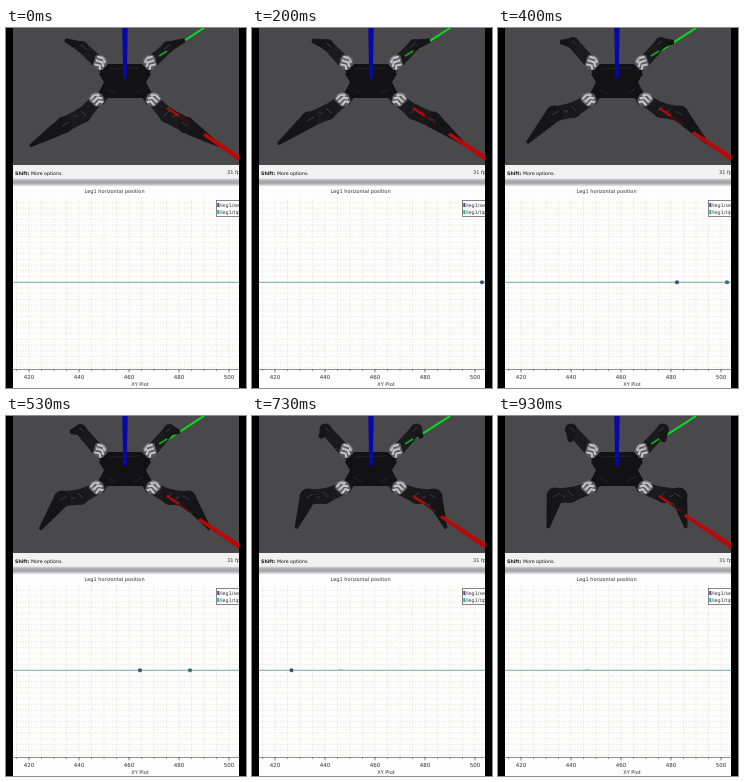
An HTML page for the animation above (0.99 s loop, 240x360 px).

```html
<!DOCTYPE html>
<html lang="en">
<head>
<meta charset="utf-8">
<title>Leg motion and plot</title>
<style>
html, body { margin: 0; width: 100%; height: 100%; overflow: hidden; background: #000; }
svg { display: block; width: 100vw; height: 100vh; font-family: "DejaVu Sans", sans-serif; fill: #333; }
</style>
</head>
<body>
<svg viewBox="0 0 240 360">
  <defs>
    <clipPath id="stage"><rect x="7" width="226" height="360"/></clipPath>
    <clipPath id="scene"><rect x="7" width="226" height="137"/></clipPath>
    <linearGradient id="bar" x2="0" y2="1">
      <stop offset="0" stop-color="#dcdcdc"/>
      <stop offset=".3" stop-color="#a8a8ac"/>
      <stop offset=".6" stop-color="#a8a8ac"/>
      <stop offset="1" stop-color="#f4f4f4"/>
    </linearGradient>
    <g id="joint">
      <path d="M-8-3L-4-7L3-7L7-2L6 5L1 8L-5 6Z" fill="#59595c"/>
      <path d="M-6-3L0-5L4-2M-5 1L1-1L5 2M-4 5L1 3L4 6" stroke="#c4c4c8" stroke-width="2.2" fill="none"/>
      <path d="M-3-6L4-4M-6 0L-2-1" stroke="#a0a0a4" stroke-width="1.4"/>
    </g>
  </defs>
  <g clip-path="url(#stage)">
    <g clip-path="url(#scene)">
      <rect x="7" width="226" height="137" fill="#49494c"/>
      <path d="M198 0L153 29" stroke="#08dc1c" stroke-width="2"/>
      <g id="left"></g>
      <g id="right" transform="translate(238 0) scale(-1 1)"></g>
      <path d="M102 36H136L145 46L140 54L145 64L137 70H101L93 64L98 54L93 46Z" fill="#121214"/>
      <path d="M103 41L133 40M101 61L110 66M137 61L128 66" stroke="#252529" fill="none"/>
      <path d="M153 28L161 23" stroke="#0cae1a" stroke-width="1.5"/>
      <path d="M161 80L173 88" stroke="#b00a0a" stroke-width="2.4"/>
      <path d="M173 88L184 96" stroke="#4c0d0f" stroke-width="2"/>
      <path id="red" fill="#b80808"/>
      <path d="M116.3 0H121.7L120.8 50H117.2Z" fill="#0708a8"/>
    </g>

    <rect x="7" y="137" width="226" height="14" fill="#f1f1f1"/>
    <text x="9" y="147" font-size="4.7" fill="#111"><tspan font-weight="bold">Shift:</tspan> More options.</text>
    <text x="221" y="146" font-size="5">31 fps</text>
    <rect x="7" y="157" width="226" height="203" fill="#fdfdfd"/>
    <rect x="7" y="150.5" width="226" height="8" fill="url(#bar)"/>
    <text x="78.5" y="164.7" font-size="5">Leg1 horizontal position</text>
    <path id="grid" stroke="#dedecb" stroke-width=".6" stroke-dasharray="1.5 1.5"/>
    <path d="M7 254.3H233" stroke="#62aaa0" stroke-width=".9"/>
    <path id="blip" d="M87 253.8H91" stroke="#87c6bc" stroke-width="1.3"/>
    <g id="dots"></g>
    <path id="axis" stroke="#777" stroke-width=".8"/>
    <g id="ticks" font-size="5.5" text-anchor="middle"></g>
    <text x="134" y="357.8" font-size="5" text-anchor="middle">XY Plot</text>
    <rect x="210.5" y="172.5" width="40" height="16" fill="#fff" stroke="#666" stroke-width=".8"/>
    <path d="M212.3 175V179" stroke="#5a3f80" stroke-width="2"/>
    <path d="M212.3 182V186" stroke="#20b4aa" stroke-width="2"/>
    <text x="213.6" y="179.2" font-size="4.9">/leg1/servo</text>
    <text x="213.6" y="186.2" font-size="4.9">/leg1/tip</text>
  </g>
</svg>
<script>
const $ = id => document.getElementById(id);
const NS = "http://www.w3.org/2000/svg";
const LOOP = 990, STEPS = 15;
const keys = [0, 70, 200, 400, 530, 730, 930];

// One track per coordinate, sampled at the key times:
// front elbow, knee and tip, rear knee and tip, red axis, plot marker.
const pose = {
  bx: [77, 77, 76, 75, 74, 73, 72],
  by: [87, 86, 84, 82, 81, 80, 79],
  cx: [58, 58, 57, 56, 56, 56, 57],
  cy: [97, 96, 92, 86, 83, 81, 80],
  tx: [24, 24.5, 26, 29, 34, 44, 50],
  ty: [118, 117, 116, 115, 113.5, 112.5, 112],
  mx: [76, 76, 75.5, 75, 74.5, 73.5, 73],
  my: [19, 18.5, 17, 15, 14, 13.5, 13.5],
  rx: [59, 59, 60, 62, 64, 68, 72],
  ry: [12, 12, 12.5, 14, 16, 22, 26],
  red: [198, 198, 197, 195, 193, 189, 187],
  dot: [272, 258, 230, 179, 134, 39.5, -70]
};

function add(parent, tag, attrs) {
  const el = document.createElementNS(NS, tag);
  for (const k in attrs) el.setAttribute(k, attrs[k]);
  parent.append(el);
  return el;
}

function slope(v, i) {
  const a = Math.max(i - 1, 0), b = Math.min(i + 1, v.length - 1);
  return (v[b] - v[a]) / (keys[b] - keys[a]);
}

function sample(v, t) {
  let i = 0;
  while (i < keys.length - 2 && t >= keys[i + 1]) i++;
  const h = keys[i + 1] - keys[i], u = Math.min((t - keys[i]) / h, 1);
  const w = u * u * (3 - 2 * u);
  return v[i] * (1 - w) + v[i + 1] * w +
    h * u * (1 - u) * ((1 - u) * slope(v, i) - u * slope(v, i + 1));
}

// Quadrilateral between two points with a width at each end.
function limb(x1, y1, x2, y2, w1, w2) {
  const d = Math.hypot(x2 - x1, y2 - y1) || 1;
  const nx = (y1 - y2) / d / 2, ny = (x2 - x1) / d / 2;
  return `M${x1 + nx * w1} ${y1 + ny * w1}L${x2 + nx * w2} ${y2 + ny * w2}` +
    `L${x2 - nx * w2} ${y2 - ny * w2}L${x1 - nx * w1} ${y1 - ny * w1}Z`;
}

const sides = ["left", "right"].map(id => {
  const g = $(id);
  const part = (fill, tag = "path", more) => add(g, tag, { fill, ...more });
  const s = {
    rear: part("#1b1b1d"), foot: part("#151517"),
    rearKnee: part("#171719", "circle", { r: 6 }),
    shin: part("#151517"), thigh: part("#1b1b1d"),
    knee: part("#161618", "circle", { r: 8.5 }),
    elbow: part("#19191b", "circle", { r: 8 }), trim: part("none")
  };
  s.trim.setAttribute("stroke", "#3a3a48");
  add(g, "path", { d: "M87 26L98 34L107 47L98 48L88 37ZM87 70L98 58L107 62L97 77Z", fill: "#19191b" });
  for (const at of ["translate(94.5 34.5) rotate(35)", "translate(91 71) rotate(-28)"])
    add(g, "use", { href: "#joint", transform: at });
  return s;
});

function drawLeg(s, p) {
  const set = (el, d) => el.setAttribute("d", d);
  const place = (el, x, y) => { el.setAttribute("cx", x); el.setAttribute("cy", y); };
  const sx = p.cx * .72 + p.tx * .28, sy = p.cy * .72 + p.ty * .28;
  set(s.rear, limb(91, 33, p.mx, p.my, 12, 11));
  set(s.foot, limb(p.mx, p.my, p.rx, p.ry, 11, 4));
  place(s.rearKnee, p.mx, p.my);
  set(s.shin, limb(p.cx, p.cy, sx, sy, 16, 13) + limb(sx, sy, p.tx, p.ty, 13, 3));
  set(s.thigh, limb(90, 73, p.bx, p.by, 12, 15) + limb(p.bx, p.by, p.cx, p.cy, 15, 15));
  place(s.knee, p.cx, p.cy);
  place(s.elbow, p.bx, p.by);
  set(s.trim, `M${p.bx - 2} ${p.by - 4}l5 5M${p.cx + 5} ${p.cy - 3}l-7 4` +
    `M${p.mx - 1} ${p.my - 2}l5 4M${p.bx - 9} ${p.by}l4 2`);
}

let grid = "", axis = "M7 341.5H233";
for (let x = 10.5; x < 233; x += 12.5) {
  grid += `M${x} 169V341`;
  axis += `M${x} 341.5v1.5`;
}
for (let y = 174.5; y < 341; y += 5.7) grid += `M7 ${y}H233`;
$("grid").setAttribute("d", grid);
for (let i = 0; i < 5; i++) {
  const x = 23 + i * 50;
  axis += `M${x} 341.5v3`;
  add($("ticks"), "text", { x, y: 350.8 }).textContent = 420 + i * 20;
}
$("axis").setAttribute("d", axis);

const dots = ["#3b4a88", "#287f88"].map(fill =>
  add($("dots"), "rect", { y: 252.8, width: 3, height: 3, rx: .6, fill, stroke: "#333657", "stroke-width": .5 }));

const stepTime = i => Math.round(i * 20 / 3) * 10;

function draw(ms) {
  const now = ms % LOOP;
  let i = STEPS - 1;
  while (i && stepTime(i) > now) i--;
  const t = stepTime(i), p = {};
  for (const k in pose) p[k] = sample(pose[k], t);
  sides.forEach(s => drawLeg(s, p));
  const ry = 81 + (p.red - 160) * .67;
  $("red").setAttribute("d", limb(p.red, ry, 240, 134.6, 3.4, 5.4));
  dots.forEach((d, n) => {
    d.setAttribute("x", p.dot + n * 50 - 1.5);
    d.setAttribute("visibility", n && t >= 730 ? "hidden" : "visible");
  });
  $("blip").setAttribute("visibility", t >= 730 ? "visible" : "hidden");
}

const start = performance.now();
function tick() {
  draw(performance.now() - start);
  requestAnimationFrame(tick);
}
tick();
</script>
</body>
</html>
```
